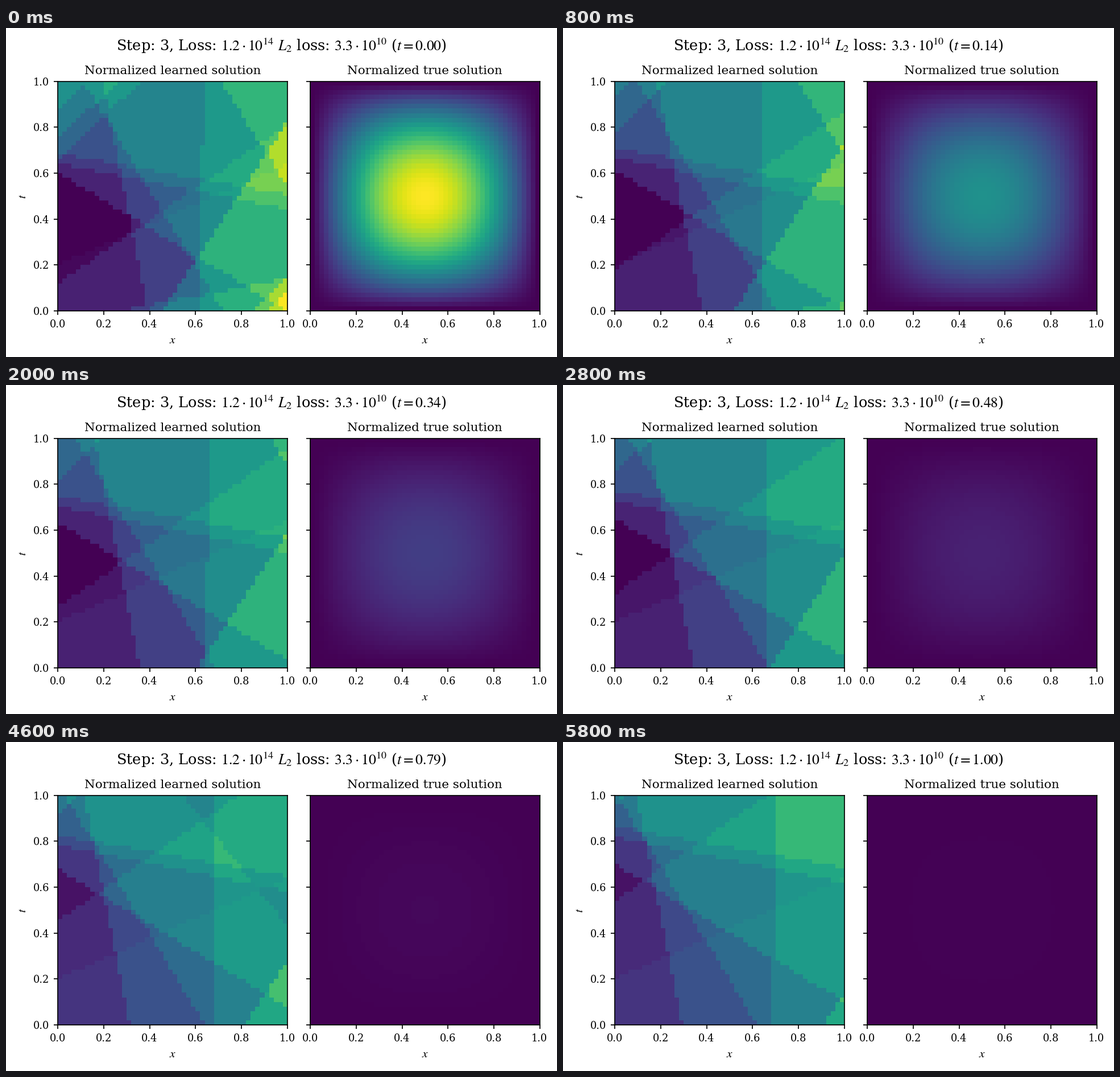
These frames come from a looping animation (969x578 px, 6 s). A matplotlib script:

```python
import numpy as np
import matplotlib.pyplot as plt
from matplotlib.animation import FuncAnimation

W, H = 969, 578
S = 2.14          # pixels per nominal point
FRAMES, STEP_MS = 30, 200
N = 50            # grid cells per side

plt.rcParams.update({
    "font.family": "DejaVu Serif",
    "mathtext.fontset": "stix",
    "font.size": 10 * S,
    "axes.titlesize": "medium",
    "axes.titlepad": 6 * S,
    "axes.labelpad": 4 * S,
    "axes.linewidth": 0.8 * S,
    "toolbar": "None",
})
for axis in ("xtick", "ytick"):
    plt.rcParams.update({
        f"{axis}.labelsize": "small",
        f"{axis}.major.size": 3.5 * S,
        f"{axis}.major.pad": 3.5 * S,
        f"{axis}.major.width": 0.8 * S,
    })

mid = (np.arange(N) + 0.5) / N
X, Y = np.meshgrid(mid, mid)
wave = np.sin(np.pi * np.linspace(0, 1, N))
BUMP = np.outer(wave, wave)


def learned(t):
    """Sum of half-plane steps whose straight edges drift with t."""
    v = np.full((N, N), -0.01)

    # long edges that cross the whole square
    v += 0.09 * (X > 0.625 + 0.007 * Y + 0.063 * t)
    v += 0.11 * (Y > 0.6 - 0.6 * X + 0.1 * t)
    v += 0.03 * (Y < 0.2 + 0.44 * X)
    v += 0.07 * (Y < 0.12 + 0.69 * X + 0.42 * t)
    v += 0.155 * (X > 0.455 + 0.66 * Y + 0.45 * t)
    v += 0.12 * (X > 1.34 - 0.63 * Y + 0.62 * t)

    # pairs: steep on the left, shallow across the middle, bottom right corner
    for k in range(2):
        v += 0.1 * (X > 0.394 + 0.326 * k - (0.2 + 0.41 * k) * Y - 0.1 * t)
        v += 0.075 * (Y > 0.64 + 0.045 * k - (0.2 - 0.02 * k) * X + 0.178 * t)
        v += 0.125 * (X > 0.86 + 0.06 * k + 0.88 * Y + 0.85 * t)

    # parallel edges leaving through the top left corner
    for y0, speed in ((0.66, 2.4), (0.75, 0.2), (0.88, 0.4)):
        v += 0.085 * (Y > y0 + 0.93 * X + speed * t)

    # quick edges: one retreats downward, one sweeps in from the lower left
    v += 0.1 * (Y < -0.05 + 0.19 * X - 0.7 * t)
    v += 0.06 * (X < -2.067 - 0.8 * Y + 4.3 * t)
    return v


def true(t):
    return BUMP * np.exp(-np.pi ** 2 / 2 * t)


def heading(t):
    return (r"Step: 3, Loss: $1.2\cdot 10^{14}$ $L_2$ loss: "
            rf"$3.3\cdot 10^{{10}}$ ($t={t:.2f}$)")


def panel(left, title, data):
    size = 403.3
    ax = fig.add_axes((left / W, 81 / H, size / W, size / H))
    img = ax.imshow(data, origin="lower", extent=(0, 1, 0, 1), aspect="auto",
                    cmap="viridis", vmin=0, vmax=1)
    ticks = np.linspace(0, 1, 6)
    ax.set_xticks(ticks)
    ax.set_yticks(ticks)
    ax.set_title(title)
    ax.set_xlabel("$x$")
    return ax, img


fig = plt.figure(figsize=(W / 72, H / 72), dpi=72, facecolor="white")
left_ax, left_img = panel(91.2, "Normalized learned solution", learned(0))
right_ax, right_img = panel(535.2, "Normalized true solution", true(0))
left_ax.set_ylabel("$t$")
right_ax.tick_params(labelleft=False)
head = fig.text(0.5, 1 - 40 / H, heading(0), size="large",
                ha="center", va="baseline")


def update(i):
    t = i / (FRAMES - 1)
    left_img.set_data(learned(t))
    right_img.set_data(true(t))
    head.set_text(heading(t))
    return left_img, right_img, head


anim = FuncAnimation(fig, update, frames=FRAMES, interval=STEP_MS,
                     repeat=True, repeat_delay=0, blit=False)
plt.show()
```
